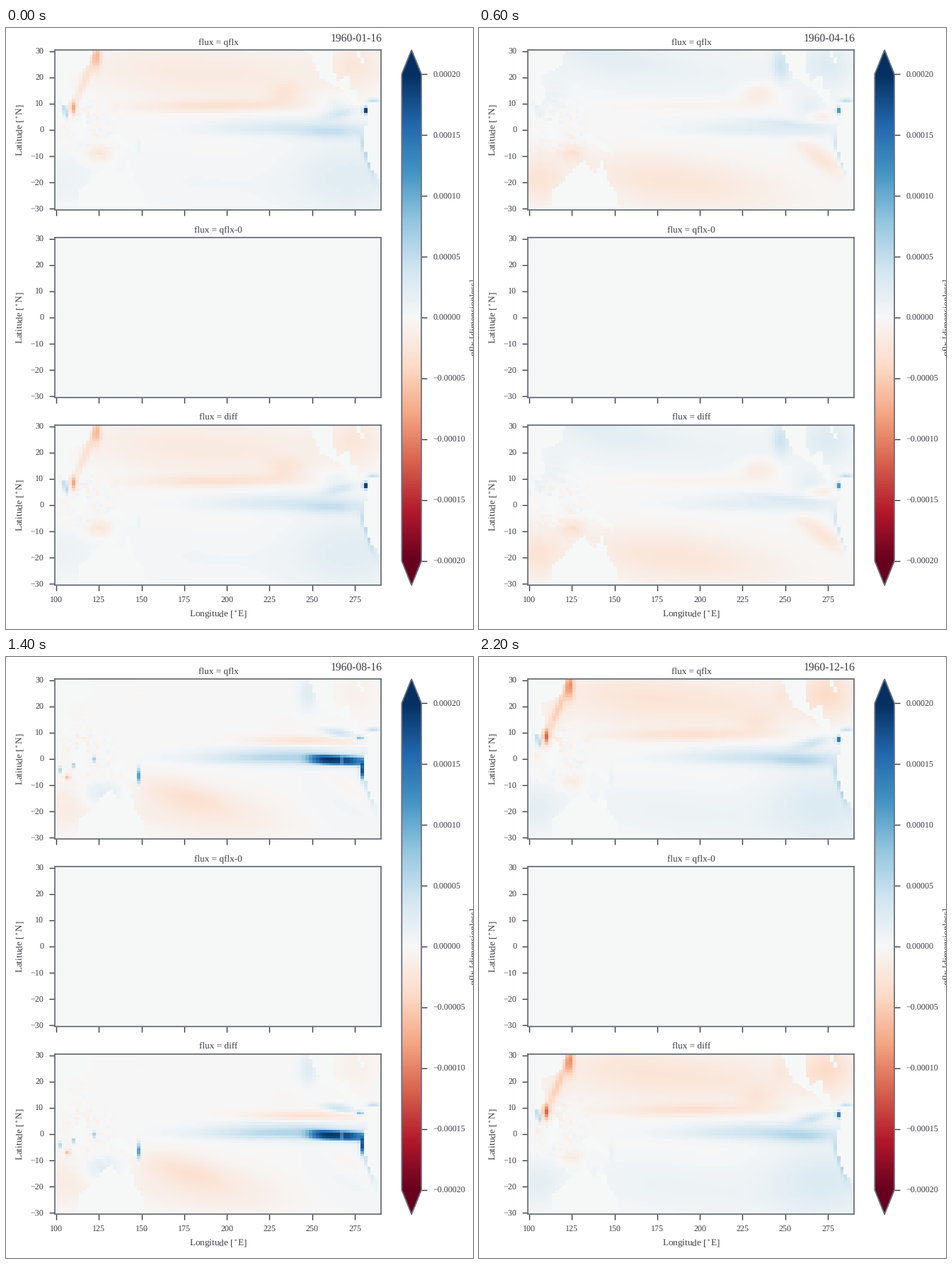
These frames come from a looping animation (660x849 px, 2400 ms). A matplotlib script:

```python
import numpy as np
import matplotlib.pyplot as plt
from matplotlib.animation import FuncAnimation
from matplotlib.path import Path

W, H = 660, 849
INK, EDGE, LAND = "#3b3b45", "#6a707c", "#f5f8f7"
LEFT, TOP, GAP, WIDE, TALL = 69.3, 31.2, 265, 460.7, 226
EXTENT = (99.3, 290.3, -30.5, 30.5)
MONTHS = 12

plt.rcParams.update({
    "font.family": "Liberation Serif", "mathtext.fontset": "stix",
    "font.size": 12, "text.color": INK, "text.hinting": "none",
    "axes.edgecolor": EDGE, "axes.facecolor": LAND, "axes.linewidth": 1.8,
    "xtick.color": INK, "ytick.color": INK,
})

# Grid of two-degree by one-degree cells
step = (EXTENT[1] - EXTENT[0]) / 95
X, Y = np.meshgrid(EXTENT[0] + step * (np.arange(95) + .5), np.arange(-30, 31))

# Seasons: sunshine peaks in mid May, upwelling a quarter year later
phase = (2 * np.pi * (np.arange(MONTHS) - 4.5) / MONTHS)[:, None, None]
sun, wind = np.cos(phase), np.sin(phase)
warm, cold = np.clip(sun, 0, 1), np.clip(-sun, 0, 1)
upwell, slack = np.clip(wind, 0, 1), np.clip(-wind, 0, 1)


def spot(lon, lat, sx, sy, slope=0, power=2):
    """Soft patch; slope tilts its long axis, power hardens its rim."""
    dx = X - lon
    dy = Y - lat - slope * dx
    return np.exp(-np.abs(dx / sx) ** power - np.abs(dy / sy) ** power)


def north():
    return (spot(195, 21, 70, 10) * (.2 * sun - .04)
            + spot(150, 27, 35, 7) * (.13 * sun - .06 * wind)
            + spot(135, 31, 20, 3) * .18 * warm
            + spot(195, 9.3, 45, 2.2, .008) * (.12 * sun + .08 * wind - .12)
            + spot(234, 14, 11, 4, .05) * (.1 * wind - .13)
            + spot(247.5, 25, 5, 6) * (.28 * sun + .18))


def asian_coast():
    return (spot(117, 19, 8, 4, 1.43) * -.4 * cold
            + spot(124, 27.5, 2.5, 5) * -.7 * cold
            + spot(110, 8.5, 1.6, 2.6) * -cold
            + spot(105.5, 7, 2, 2.5, -1) * .75 * (cold + .3 * slack)
            + spot(113, 13, 9, 9, .5) * (.2 * slack - .14 * cold - .1 * warm))


def equator():
    gap = spot(267.5, -.5, 1, 2)
    return (spot(235, 1.2, 45, 3.2) * (.3 - .06 * sun + .14 * wind)
            + spot(225, 0, 45, 1.8) * (.12 + .08 * wind)
            + spot(262, -1, 20, 2.6) * (.2 - .14 * sun)
            + spot(250, 2.4, 20, 1.2, -.06) * .25 * warm
            + spot(265, -.6, 16.5, 1.8, -.03, 4) * (1 - .4 * gap) * 1.5 * upwell)


def central_america():
    return (spot(245, 7, 32, 1.8) * -.3 * upwell
            + spot(270, 5, 7, 2) * -.28 * warm
            + spot(266, 6, 10, 1.7, .16) * .38 * cold
            + spot(266, 9.8, 9, 1.5, -.1) * .45 * upwell
            + spot(264, 9, 9, 4) * .22 * slack
            + spot(281, 7.5, 1.3, 1.2) * (2 * slack + 1.2 * cold)
            + spot(278, 8, 2, .8) * upwell
            + spot(286, 11.2, 4, .8) * .5
            + spot(275, 25, 15, 9) * (.3 * sun - .12 * wind - .06))


def south():
    return (spot(272, -18, 34, 14) * (.11 - .17 * sun)
            + spot(185, -20, 60, 10, -.07) * (-.1 - .21 * sun)
            + spot(176, -14, 24, 5.5, -.16) * -.2 * upwell
            + spot(271, -11, 13, 4, -.4) * -.35 * warm
            + spot(279, -4.5, 1.1, 3) * (.2 + 1.5 * upwell)
            + spot(282.5, -11, 3.5, 3, -1.6) * .45)


def archipelago():
    vents = sum(spot(lon, lat, 1.3, 1.3)
                for lon, lat in ((102, -4.3), (110.5, -2.3), (122.5, -.3)))
    speck = np.random.default_rng(7).normal(size=X.shape)
    speck += np.roll(speck, 1, 0) + np.roll(speck, 1, 1)
    return (spot(105, -19, 14, 9) * (-.07 - .25 * sun)
            + spot(125, -9, 7, 3) * (.12 * wind - .16)
            + spot(128, -13, 12, 5) * .28 * upwell
            + spot(148.3, -6.5, .9, 3) * (.1 + 1.2 * upwell)
            + spot(107, -7, 1.3, .9) * -.7 * upwell
            + .65 * vents * upwell
            + spot(117, 1, 15, 11) * .04 * speck)


# Land outlines as (longitude, latitude) corners
COASTS = {
    "asia": [(99, 31), (121.5, 31), (119, 25), (114, 22.5), (107, 21),
             (108.8, 15), (109, 11.5), (105.5, 9), (100.5, 13), (103.5, 1.5),
             (99, 7)],
    "australia": [(113.5, -31), (113.5, -23.5), (122, -18), (127.5, -14),
                  (132.5, -11.6), (139, -17.3), (142.2, -10.8), (146, -18.5),
                  (151, -23.5), (153.5, -31)],
    "mexico": [(247.4, 31), (254.5, 20), (266, 16), (274.5, 10), (281, 8.7),
               (276.4, 11), (276.6, 15), (272, 16), (272.5, 21.3),
               (264.5, 18.5), (262.5, 22.5), (263, 31)],
    "peru": [(282.6, 8), (284, 10.5), (291, 10.6), (291, -31), (289.6, -31),
             (289.4, -19), (284.2, -14), (280.2, -6), (279.8, -2), (282.4, 4)],
    "borneo": [(109, 1.5), (116.5, 6.5), (118.5, 4.5), (116, -3.5), (111, -3.2)],
    "guinea": [(131, -1), (138, -2), (147, -6.5), (147, -9), (133, -4)],
    "florida": [(276, 31), (278.6, 31), (279.6, 25.2), (277.6, 26)],
}

flux = (north() + asian_coast() + equator() + central_america()
        + south() + archipelago())
cells = np.column_stack([X.ravel(), Y.ravel()])
for coast in COASTS.values():
    flux[:, Path(coast).contains_points(cells).reshape(X.shape)] = np.nan

fig = plt.figure(figsize=(W / 72, H / 72), dpi=72, facecolor="white")


def panel(x, top, w, h):
    return fig.add_axes([x / W, 1 - (top + h) / H, w / W, h / H])


def label(x, y, text, size=13.3, **kw):
    kw = {"ha": "center", "va": "baseline"} | kw
    return fig.text(x / W, 1 - y / H, text, size=size, **kw)


maps = []
for row, name in enumerate(("qflx", "qflx-0", "diff")):
    top = TOP + GAP * row
    ax = panel(LEFT, top, WIDE, TALL)
    maps.append(ax.imshow(np.full(X.shape, np.nan), cmap="RdBu", vmin=-2, vmax=2,
                          extent=EXTENT, origin="lower", aspect="auto",
                          interpolation="nearest"))
    ax.set_xticks(range(100, 276, 25))
    ax.set_yticks(range(-30, 31, 10))
    ax.tick_params(length=8, width=1.4, pad=8, labelbottom=name == "diff")
    label(300, top - 8.4, f"flux = {name}")
    label(20, top + TALL / 2, r"Latitude [$^\circ$N]", rotation=90, va="center")
label(300, 831, r"Longitude [$^\circ$E]")
date = label(532, 19.2, "", 15.6, ha="right")

bar = fig.colorbar(maps[0], cax=panel(559.3, 31, 27.7, 756.2), extend="both")
bar.outline.set_linewidth(1.8)
ticks = np.arange(-2, 2.1, .5)
bar.set_ticks(ticks, labels=[f"{t / 1e4:.5f}".replace("-", "\u2212") for t in ticks])
bar.ax.tick_params(length=8, width=1.4, pad=8.5)
label(654.7, 409, "qflx [dimensionless]", rotation=90, ha="left", va="center")


def draw(month):
    maps[0].set_data(flux[month])
    maps[2].set_data(flux[month])
    date.set_text(f"1960-{month + 1:02d}-16")
    return maps + [date]


anim = FuncAnimation(fig, draw, frames=MONTHS, interval=200, repeat=True)
plt.show()
```
